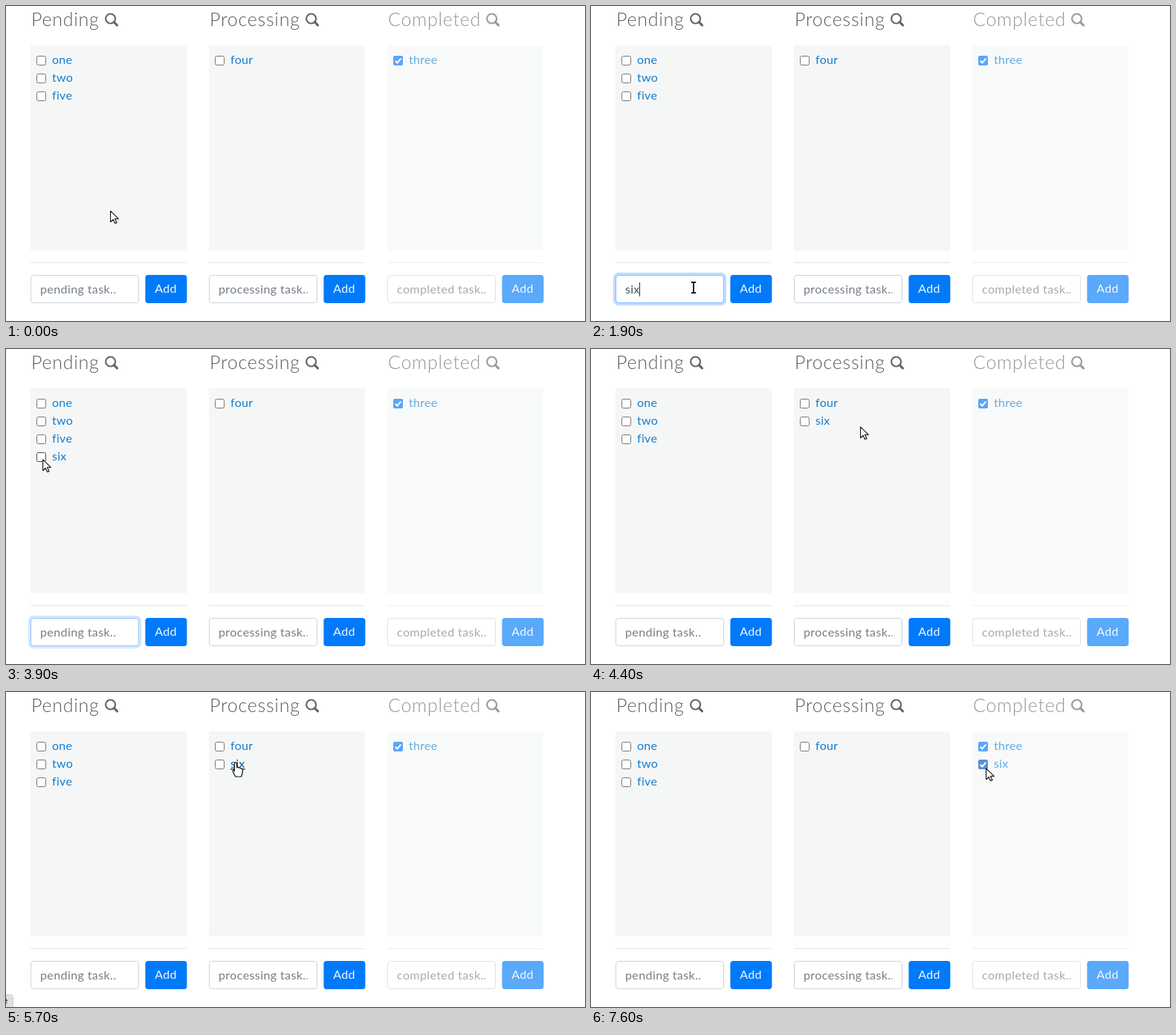
Write an HTML page that moves like this. It is 779 px wide and 424 px high and loops after 8 s.

```html
<!DOCTYPE html>
<html lang="en">
<head>
<meta charset="utf-8">
<title>Task board</title>
<style>
html, body { margin: 0; width: 100%; height: 100%; overflow: hidden; background: #fff; }
svg { display: block; width: 779px; height: 424px; font: 16px Lato, "Open Sans", sans-serif; }
.title { font-size: 25px; font-weight: 300; letter-spacing: .75px; fill: #565e62; }
.link { letter-spacing: .3px; fill: #127ed0; }
.hint, .add { letter-spacing: .4px; }
.hint { fill: #757e86; }
.add { fill: #f2f8ff; }
.typed { fill: #495057; letter-spacing: .25px; }
.done { opacity: .65; }

/* Every track lasts one loop and holds each value until the next key: 1% = 80 ms */
.t { animation: 8s step-end infinite; }
.cursor { animation-name: move; }
.arrow { animation-name: arrow; }
.ibeam { animation-name: ibeam; }
.hand { animation-name: hand; }
.ring { animation-name: ring; }
.caret { animation-name: caret; }
.prompt { animation-name: prompt; }
.s { animation-name: key-s; }
.si { animation-name: key-si; }
.six { animation-name: key-six; }
.in-pending { animation-name: in-pending; }
.in-processing { animation-name: in-processing; }
.in-completed { animation-name: in-completed; }
.hover-link { animation-name: hover-link; }
.status { animation-name: status; }
.hover-box { animation-name: hover-box; }
.hover-check { animation-name: hover-check; }

@keyframes move {
  0% { transform: translate(140px, 275px); }
  7.5% { transform: translate(137px, 331px); }
  10% { transform: translate(136px, 345px); }
  11.25% { transform: translate(137px, 370px); }
  12.5% { transform: translate(138px, 379px); }
  37.5% { transform: translate(146px, 387px); }
  38.75% { transform: translate(128px, 292px); }
  40% { transform: translate(107px, 193px); }
  41.25% { transform: translate(93px, 176px); }
  42.5% { transform: translate(80px, 165px); }
  43.75% { transform: translate(69px, 157px); }
  45% { transform: translate(59px, 152px); }
  46.25% { transform: translate(52px, 149px); }
  47.5% { transform: translate(49px, 148px); }
  53.75% { transform: translate(210px, 133px); }
  55% { transform: translate(362px, 104px); }
  56.25% { transform: translate(364px, 106px); }
  57.5% { transform: translate(360px, 109px); }
  58.75% { transform: translate(352px, 113px); }
  60% { transform: translate(342px, 116px); }
  61.25% { transform: translate(331px, 117px); }
  62.5% { transform: translate(321px, 116px); }
  63.75% { transform: translate(313px, 112px); }
  65% { transform: translate(308px, 104px); }
  66.25% { transform: translate(306px, 99px); }
  67.5% { transform: translate(304px, 96px); }
  68.75% { transform: translate(303px, 95px); }
  71.25% { transform: translate(309px, 95px); }
  83.75% { transform: translate(345px, 94px); }
  85% { transform: translate(415px, 95px); }
  86.25% { transform: translate(492px, 98px); }
  87.5% { transform: translate(552px, 102px); }
  88.75% { transform: translate(586px, 106px); }
  91.25% { transform: translate(549px, 124px); }
  93.75% { transform: translate(539px, 112px); }
  95%, to { transform: translate(531px, 102px); }
}
@keyframes arrow {
  0%, 38.75%, 91.25%, to { opacity: 1; }
  11.25%, 65% { opacity: 0; }
}
@keyframes ibeam { 0%, 38.75%, to { opacity: 0; } 11.25% { opacity: 1; } }
@keyframes hand { 0%, 91.25%, to { opacity: 0; } 65% { opacity: 1; } }
@keyframes ring {
  0%, 51.25%, to { opacity: 0; }
  13.75% { opacity: .5; }
  15% { opacity: 1; }
  48.75% { opacity: .7; }
  50% { opacity: .3; }
}
@keyframes caret {
  0%, 37.5%, to { opacity: 0; transform: none; }
  13.75%, 30% { opacity: 1; transform: none; }
  17.5% { opacity: 1; transform: translateX(7px); }
  21.25% { opacity: 1; transform: translateX(11px); }
  23.75% { opacity: 1; transform: translateX(19px); }
}
@keyframes prompt { 0%, 30%, to { opacity: 1; } 17.5% { opacity: 0; } }
@keyframes key-s { 0%, 21.25%, to { opacity: 0; } 17.5% { opacity: 1; } }
@keyframes key-si { 0%, 23.75%, to { opacity: 0; } 21.25% { opacity: 1; } }
@keyframes key-six { 0%, 30%, to { opacity: 0; } 23.75% { opacity: 1; } }
@keyframes in-pending { 0%, 50%, to { opacity: 0; } 30% { opacity: 1; } }
@keyframes in-processing { 0%, 91.25%, to { opacity: 0; } 50% { opacity: 1; } }
@keyframes in-completed { 0% { opacity: 0; } 91.25%, to { opacity: 1; } }
@keyframes hover-link {
  0%, 91.25%, to { fill: #127ed0; text-decoration: none; }
  65% { fill: #0b5a9e; text-decoration: underline; }
}
@keyframes status { 0%, 91.25%, to { opacity: 0; } 66.25% { opacity: 1; } }
@keyframes hover-box { 0%, 50%, to { stroke: #767676; } 46.25% { stroke: #4a4a4a; } }
@keyframes hover-check { 0% { fill: #0075f8; } 95%, to { fill: #0250bb; } }
</style>
</head>
<body>
<svg viewBox="0 0 779 424">
  <defs>
    <clipPath id="field"><path d="M13 364h119.5v34H13z"/></clipPath>
    <g id="frame">
      <path d="M0 53h210v276H0z" fill="#f5f7f7"/>
      <path d="M0 345h210v1H0z" fill="#000" fill-opacity=".1"/>
      <rect x=".5" y="362.5" width="145" height="37" rx="3.5" fill="#fff" stroke="#ced4da"/>
      <rect x="154.4" y="362" width="56" height="38" rx="4" fill="#007af9"/>
      <text class="add" x="167.2" y="385.6">Add</text>
    </g>
    <g id="lens" fill="none" stroke="#666">
      <circle cx="7.6" cy="8" r="6.5" stroke-width="2.2"/>
      <path d="M12.3 12.7l4.2 4.2" stroke-width="3.2" stroke-linecap="round"/>
    </g>
    <rect id="box" x="8.5" y="67.5" width="12" height="12" rx="2" fill="#fff"/>
    <g id="tick">
      <rect x="8" y="67" width="13" height="13" rx="2"/>
      <path d="M10.8 73.7l2.6 2.7 5-5.8" fill="none" stroke="#fff" stroke-width="2"/>
    </g>
    <path id="beam" d="M-3.2-7.2H-1L0-6.6 1-7.2H3.2M0-6.6V6.6M-3.2 7.2H-1L0 6.6 1 7.2H3.2"/>
  </defs>

  <g transform="translate(33)">
    <use href="#frame"/>
    <text class="title" x="1" y="27">Pending</text>
    <use href="#lens" x="100" y="9"/>
    <g stroke="#767676">
      <use href="#box"/>
      <use href="#box" y="24"/>
      <use href="#box" y="48"/>
    </g>
    <g class="link">
      <text x="29" y="78">one</text>
      <text x="29" y="102">two</text>
      <text x="29" y="126">five</text>
    </g>
    <g class="t in-pending">
      <use class="t hover-box" href="#box" y="72"/>
      <text class="link" x="29" y="150">six</text>
    </g>
    <g class="t ring" fill="none">
      <rect x="-1.6" y="360.4" width="149.2" height="41.2" rx="5.6" stroke="#007bff" stroke-opacity=".25" stroke-width="3.2"/>
      <rect x=".5" y="362.5" width="145" height="37" rx="3.5" stroke="#80bdff"/>
    </g>
    <text class="hint t prompt" x="13" y="387">pending task..</text>
    <g class="typed">
      <text class="t s" x="13" y="387">s</text>
      <text class="t si" x="13" y="387">si</text>
      <text class="t six" x="13" y="387">six</text>
    </g>
    <path class="t caret" d="M13 372h1v19h-1z" fill="#333"/>
  </g>

  <g transform="translate(273)">
    <use href="#frame"/>
    <text class="title" x="1" y="27">Processing</text>
    <use href="#lens" x="130" y="9"/>
    <use href="#box" stroke="#767676"/>
    <text class="link" x="29" y="78">four</text>
    <g class="t in-processing">
      <use href="#box" y="24" stroke="#767676"/>
      <text class="link t hover-link" x="29" y="102">six</text>
    </g>
    <text class="hint" x="13" y="387" clip-path="url(#field)">processing task..</text>
  </g>

  <g class="done" transform="translate(513)">
    <use href="#frame"/>
    <text class="title" x="1" y="27">Completed</text>
    <use href="#lens" x="133" y="9"/>
    <use href="#tick" fill="#0075f8"/>
    <text class="link" x="29" y="78">three</text>
    <g class="t in-completed">
      <use class="t hover-check" href="#tick" y="24"/>
      <text class="link" x="29" y="102">six</text>
    </g>
    <text class="hint" x="13" y="387" clip-path="url(#field)">completed task..</text>
  </g>

  <g class="t status">
    <path d="M-1 407.5H6q3.5 0 3.5 3.5V425H-1z" fill="#e0e0e3" stroke="#cfcfd4"/>
    <text x="-6" y="421" font-family="DejaVu Sans, sans-serif" font-size="11" fill="#222">#</text>
  </g>

  <g class="t cursor" stroke-linejoin="round">
    <g class="t arrow">
      <path d="M1.5 2V17l3.7-3.4 2.5 5 2.4-1.1-2.4-5h5z" fill="#000" opacity=".2"/>
      <path d="M.6.8V15.6l3.5-3.3 2.5 5.2 2.3-1.1-2.4-5.1h4.9z" fill="#fff" stroke="#111" stroke-width="1.1"/>
    </g>
    <g class="t ibeam" fill="none">
      <use href="#beam" stroke="#fff" stroke-width="3.6"/>
      <use href="#beam" stroke="#000" stroke-width="1.7"/>
    </g>
    <path class="t hand" d="M-1.6 1.4Q-1.6-.2 0-.2T1.6 1.4V6.5Q3.6 5.6 4.4 7.2 6.2 6.4 6.9 8 9.2 7.6 9.2 10V13.5L7.6 19H-.2L-3.6 12.6Q-4.2 10.6-3 10.3T-1.6 11.4z" fill="#fff" stroke="#111" stroke-width="1.2"/>
  </g>
</svg>
</body>
</html>
```
